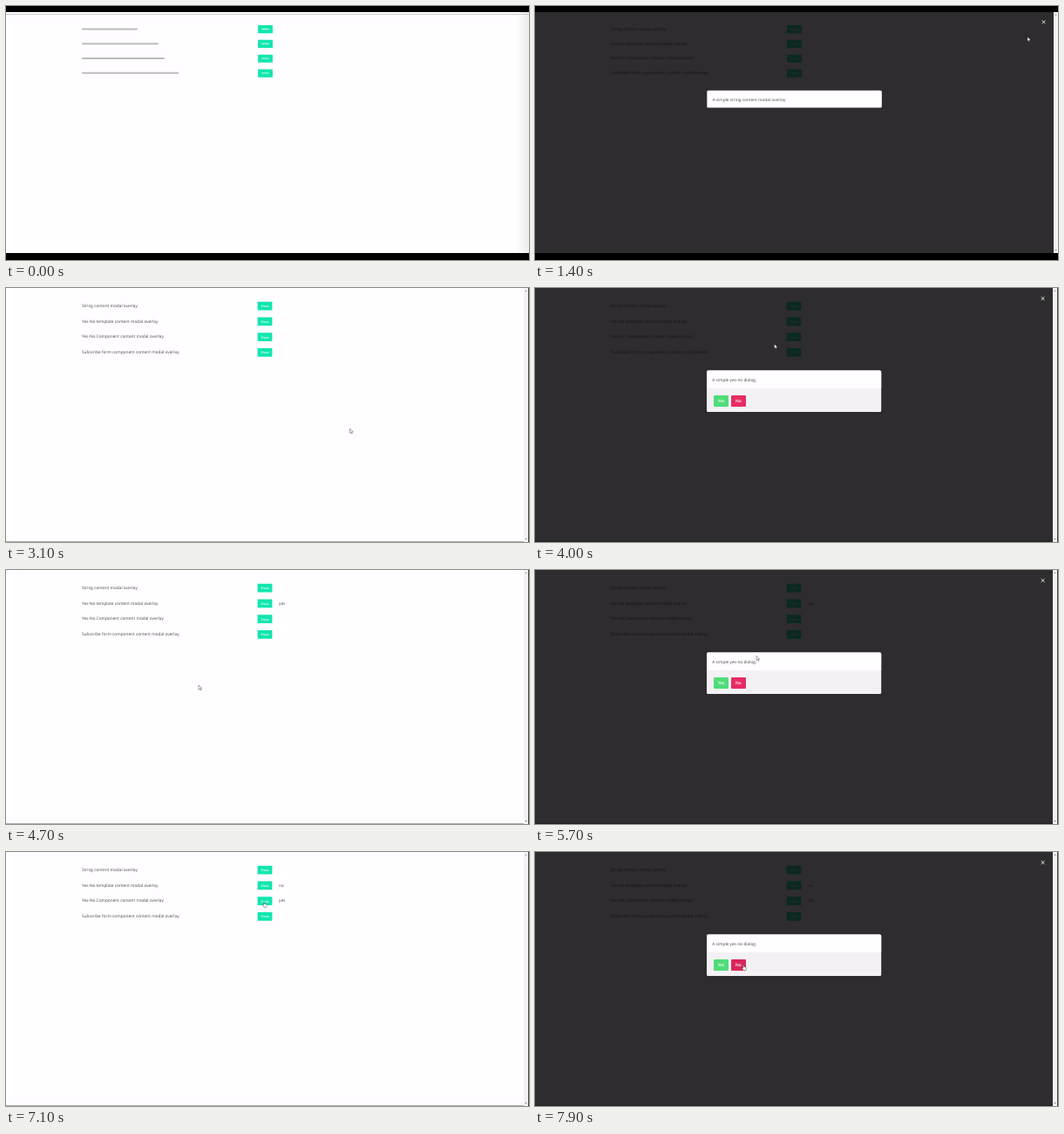
An HTML page that plays this animation: 600x291 px, repeating every 8 s.

```html
<!DOCTYPE html>
<html lang="en">
<head>
<meta charset="utf-8">
<title>Modal overlay demo</title>
<style>
  html, body { margin: 0; width: 100%; height: 100%; overflow: hidden; background: #000; }
  svg { display: block; width: 100vw; height: 100vh; }
  text { font: 4.78px "Open Sans", "Noto Sans", sans-serif; fill: #4a4a4a; text-rendering: geometricPrecision; }
  .label { font-size: 3.5px; font-weight: 600; fill: #fff; text-anchor: middle; }
  .choice { font-weight: 600; fill: #fff; text-anchor: middle; }
</style>
</head>
<body>
<svg id="stage" viewBox="0 0 600 291" preserveAspectRatio="none">
  <defs>
    <linearGradient id="edge"><stop offset="0" stop-color="#fffdff"/><stop offset="1" stop-color="#e9ebe9"/></linearGradient>
  </defs>
  <rect width="600" height="291"/>
  <g id="scene">
    <rect width="600" height="291" fill="#fffdff"/>
    <rect id="base" y="290" width="594" height="1" fill="#aab0ac"/>
    <g id="rows"></g>
    <g id="overlay">
      <rect width="594" height="291" fill="#0a080a" fill-opacity=".85"/>
      <g id="note">
        <rect x="197" y="94.5" width="200.2" height="21" rx="1.6" fill="#fffdff"/>
        <text x="203.2" y="107.4">A simple string content modal overlay</text>
      </g>
      <g id="dialog">
        <rect x="197" y="94.5" width="200.2" height="47.6" rx="1.6" fill="#f3f1f4"/>
        <path d="M197 115V96.1q0-1.6 1.6-1.6h197q1.6 0 1.6 1.6V115z" fill="#fffdff"/>
        <text x="203.3" y="107.2">A simple yes-no dialog.</text>
        <rect id="yes" x="205" y="123" width="17" height="13" rx="1.2"/>
        <rect id="no" x="225" y="123" width="17" height="13" rx="1.2"/>
        <text class="choice" x="213.5" y="131.2">Yes</text>
        <text class="choice" x="233.3" y="131.2">No</text>
      </g>
      <path d="M580.7 10.1l3.8 3.8M584.5 10.1l-3.8 3.8" stroke="#fff" stroke-width=".9"/>
    </g>
    <rect x="594" width="5" height="291" fill="#f3f2f3"/>
    <path d="M595.4 3.8l1.2-1.4 1.2 1.4zM595.4 287l1.2 1.4 1.2-1.4z" fill="#777"/>
    <rect x="599" width="1" height="291" fill="#444"/>
    <g id="cursor" stroke="#222" stroke-width=".4" stroke-linejoin="round" fill="#fff">
      <path id="arrow" d="M0 0V5.2L1.2 4.1 2 5.9 2.8 5.5 2 3.8H3.7Z"/>
      <path id="hand" d="M-.5 .4Q0-.3 .5 .4V2.3L2.9 2.8Q3.4 3 3.3 3.7L2.8 6.4H.1L-1.6 3.9Q-1.6 3.1-.5 3.6Z"/>
    </g>
  </g>
  <g id="soft">
    <rect x="586" y="7" width="14" height="276" fill="url(#edge)"/>
    <rect y="9" width="600" height="1" fill="#c9c9c9"/>
  </g>
</svg>
<script>
const LOOP = 8000, STEP = 100, FULL_AT = 1500;
const $ = id => document.getElementById(id);
const clamp = v => Math.max(0, Math.min(1, v));

// the page starts letterboxed
const BOXED = `matrix(${595 / 594} 0 0 ${276 / 291} 0 7)`;

const titles = [
  "String content modal overlay",
  "Yes-No template content modal overlay",
  "Yes-No Component content modal overlay",
  "Subscribe form component content modal overlay"
];
const barWidths = [64, 88, 95, 111];

// opening time, closing time, content
const modals = [
  [900, 1900, "note"], [2300, 3000, "dialog"], [3400, 4700, "dialog"],
  [5100, 6000, "dialog"], [6200, 6900, "dialog"], [7300, 8000, "dialog"]
];

// time, row, answer
const answers = [[4700, 1, "yes"], [6000, 1, "no"], [6900, 2, "yes"]];

// time, x, y of the pointer tip
const path = [
  [0, 296, 23], [1100, 296, 23], [1400, 564, 30], [1600, 582, 11], [1900, 582, 11],
  [2100, 334.3, 28], [2200, 297, 37], [2400, 297, 37], [2800, 394.5, 161], [3100, 394.5, 161],
  [3300, 296, 37], [3800, 296, 37], [4500, 221, 132], [4700, 221, 132], [5000, 296, 37],
  [5500, 296, 37], [5800, 233, 129], [6000, 233, 129], [6100, 295.2, 57], [6500, 295.2, 57],
  [6800, 214, 129], [6900, 214, 129], [7100, 296, 57], [7500, 296, 57], [7700, 275, 105],
  [7800, 245, 126], [7900, 239.2, 129.3]
];

function add(parent, tag, attrs, text = "") {
  const el = document.createElementNS("http://www.w3.org/2000/svg", tag);
  for (const k in attrs) el.setAttribute(k, attrs[k]);
  el.textContent = text;
  return parent.appendChild(el);
}

const sharp = [], replies = [], shows = [];
titles.forEach((title, i) => {
  const y = 17.75 * i;
  shows.push(add($("rows"), "rect", { x: 288.6, y: y + 15.8, width: 16.8, height: 9.7, rx: .4, fill: "#12e6af" }));
  sharp.push(add($("rows"), "text", { x: 87, y: y + 21.8 }, title));
  sharp.push(add($("rows"), "text", { class: "label", x: 297, y: y + 22 }, "Show"));
  replies.push(add($("rows"), "text", { x: 313, y: y + 21.8 }));
  const by = 25.4 + 16.8 * i;
  add($("soft"), "rect", { x: 87, y: by, width: barWidths[i], height: 2, rx: 1, fill: "#bdbcbd" });
  add($("soft"), "rect", { x: 293, y: by + .4, width: 9, height: 1.4, rx: .7, fill: "#a5f3dc" });
});

function pointAt(t) {
  let i = 0;
  while (i < path.length - 2 && path[i + 1][0] <= t) i++;
  const [t0, x0, y0] = path[i], [t1, x1, y1] = path[i + 1];
  const k = clamp((t - t0) / (t1 - t0));
  return [x0 + (x1 - x0) * k, y0 + (y1 - y0) * k];
}

function over(el, x, y) {
  const [l, t, w, h] = ["x", "y", "width", "height"].map(k => +el.getAttribute(k));
  return x >= l && x <= l + w && y >= t && y <= t + h;
}

function render(t) {
  const full = t >= FULL_AT;
  $("scene").setAttribute("transform", full ? "" : BOXED);
  $("base").style.opacity = full ? 1 : 0;

  const focus = clamp(t / 400);
  $("soft").style.opacity = 1 - focus;
  sharp.forEach(el => el.style.opacity = focus);

  replies.forEach((el, row) => {
    const said = answers.filter(a => a[1] === row && t >= a[0]).pop();
    el.textContent = said ? said[2] : "";
  });

  const open = modals.find(m => t >= m[0] && t < m[1]);
  $("overlay").style.opacity = open ? clamp((t - open[0] + STEP) / 300) : 0;
  for (const id of ["note", "dialog"]) $(id).style.display = open && open[2] === id ? "" : "none";

  const [x, y] = pointAt(t);
  const dialog = open && open[2] === "dialog";
  const onYes = dialog && over($("yes"), x, y);
  const onNo = dialog && over($("no"), x, y);
  const onClose = open && Math.hypot(x - 582.6, y - 12) < 6;
  const onShow = !open && shows.some(el => over(el, x, y));
  const hand = onYes || onNo || onClose || onShow;
  $("yes").setAttribute("fill", onYes ? "#48d06e" : "#50dc78");
  $("no").setAttribute("fill", onNo ? "#d9265a" : "#e62c63");
  $("arrow").style.display = hand ? "none" : "";
  $("hand").style.display = hand ? "" : "none";
  $("cursor").style.opacity = focus;
  $("cursor").setAttribute("transform", `translate(${x} ${y})`);
}

const start = performance.now();
function tick() {
  const t = (performance.now() - start) % LOOP;
  render(Math.floor(t / STEP) * STEP);
  requestAnimationFrame(tick);
}
tick();
</script>
</body>
</html>
```
